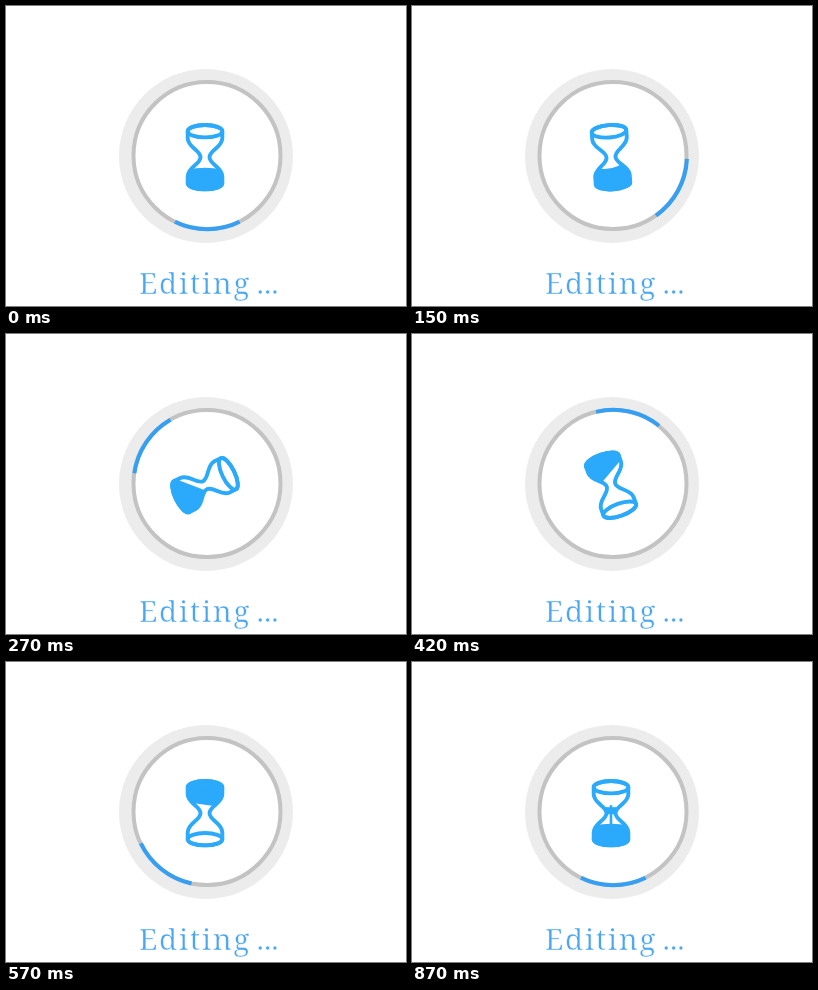
An HTML page with a canvas that plays this animation: 400 px wide and 300 px high, repeating every 900 ms.

```html
<!DOCTYPE html>
<html lang="en">
<head>
<meta charset="utf-8">
<title>Editing</title>
<style>
  html, body { margin: 0; width: 100%; height: 100%; overflow: hidden; background: #fff; }
  canvas { display: block; width: 400px; height: 300px; }
</style>
</head>
<body>
<canvas id="stage" width="400" height="300"></canvas>
<script>
const ctx = document.getElementById('stage').getContext('2d');
const LOOP = 900, STEP = 30, FLIP_END = 570;
const BLUE = '#2ba9fb', RAD = Math.PI / 180;

// Cubic bezier easing, solved for x by bisection
function bezier(x1, y1, x2, y2) {
  const at = (a, b, s) => 3 * (1 - s) ** 2 * s * a + 3 * (1 - s) * s * s * b + s ** 3;
  return x => {
    if (x >= 1) return 1;
    let lo = 0, hi = 1;
    for (let i = 0; i < 30; i++) {
      const mid = (lo + hi) / 2;
      if (at(x1, x2, mid) < x) lo = mid; else hi = mid;
    }
    return at(y1, y2, lo);
  };
}
const ringEase = bezier(0.465, 0, 0.425, 1);
const flipEase = bezier(0.5, -0.39, 0.5, 1.005);

// Linear track through [time, value] pairs
function track(t, ...keys) {
  if (t <= keys[0][0]) return keys[0][1];
  for (let i = 1; i < keys.length; i++) {
    const [t0, v0] = keys[i - 1], [t1, v1] = keys[i];
    if (t <= t1) return v0 + (v1 - v0) * (t - t0) / (t1 - t0);
  }
  return keys[keys.length - 1][1];
}

function disc(x, y, r, color) {
  ctx.fillStyle = color;
  ctx.beginPath();
  ctx.arc(x, y, r, 0, 2 * Math.PI);
  ctx.fill();
}

function arc(x, r, from, to, color) {
  ctx.strokeStyle = color;
  ctx.lineWidth = 4;
  ctx.beginPath();
  ctx.arc(x, 149.5, r, from * RAD, to * RAD);
  ctx.stroke();
}

function ring(t) {
  disc(200, 150, 87, '#ececec');
  disc(201, 149.5, 73.5, '#fff');
  arc(201, 73.5, 0, 360, '#c3c3c3');
  const mid = 90 - 720 * ringEase(t / 720);
  arc(201.3, 73.7, mid - 26, mid + 26, '#359ff4');
}

const glass = new Path2D(
  'M-17.3-26V-19C-17.3-10-4.5-7-4.5 0S-17.3 10-17.3 19V26' +
  'A17.3 6.2 0 0 0 17.3 26V19C17.3 10 4.5 7 4.5 0S17.3-10 17.3-19V-26' +
  'A17.3 6.2 0 0 0-17.3-26Z');
const rims = new Path2D(
  'M-17.3-26A17.3 6.2 0 0 1 17.3-26A17.3 6.2 0 0 1-17.3-26Z' +
  'M-17.3 26A17.3 6.2 0 0 1 17.3 26A17.3 6.2 0 0 1-17.3 26Z');

// A sand surface: height on the axis, slope, and how far its edges lie below
const surface = (y, slope = 0, sag = 0) => ({ y, slope, sag });

function sand(a, b) {
  const w = 20;
  const mid = s => s.y - s.sag;
  const edge = (s, x) => s.y + s.sag + x * s.slope;
  ctx.beginPath();
  ctx.moveTo(-w, edge(a, -w));
  ctx.quadraticCurveTo(0, mid(a), w, edge(a, w));
  ctx.lineTo(w, edge(b, w));
  ctx.quadraticCurveTo(0, mid(b), -w, edge(b, -w));
  ctx.fill();
}

function hourglass(t) {
  ctx.save();
  ctx.translate(199, 151.2);
  ctx.rotate(180 * flipEase(t / 540) * RAD);
  ctx.fillStyle = ctx.strokeStyle = BLUE;
  ctx.lineWidth = 3.9;
  ctx.lineJoin = 'round';

  ctx.save();
  ctx.clip(glass);
  const tilt = track(t, [0, 0], [120, 0], [270, -43], [390, -38], [FLIP_END, 8], [630, 0]);
  const near = surface(
    track(t, [0, 10.5], [120, 12], [270, 6.5], [390, 10.5], [FLIP_END, 8.5], [630, -1]),
    Math.tan(tilt * RAD),
    track(t, [0, 3], [120, -8], [270, 0]));
  const far = surface(
    track(t, [FLIP_END, 38], [690, 20], [870, 6]), 0,
    track(t, [FLIP_END, 0], [660, 5], [870, 1]));
  sand(near, far);
  if (t > FLIP_END) {
    sand(surface(-40), surface(track(t, [660, -36], [870, -10.5]), 0, -3));
    ctx.fillRect(-1.3, 8, 2.6, -track(t, [FLIP_END, 8], [660, 32]));
  }
  ctx.restore();

  ctx.stroke(glass);
  ctx.stroke(rims);
  ctx.restore();
}

function thinText(text, x, y) {
  ctx.fillText(text, x, y);
  ctx.strokeText(text, x, y);
}

function caption() {
  ctx.fillStyle = '#4aa6ee';
  ctx.strokeStyle = '#fff';
  ctx.lineWidth = 0.5;
  ctx.font = '300 29.5px "Noto Serif", serif';
  ctx.letterSpacing = '1.6px';
  thinText('Editing', 133, 288);
  ctx.letterSpacing = '0px';
  thinText('...', 250.5, 288);
}

function frame(now) {
  const t = Math.floor(now % LOOP / STEP) * STEP;
  ctx.fillStyle = '#fff';
  ctx.fillRect(0, 0, 400, 300);
  ring(t);
  hourglass(t);
  caption();
  requestAnimationFrame(frame);
}
requestAnimationFrame(frame);
</script>
</body>
</html>
```
